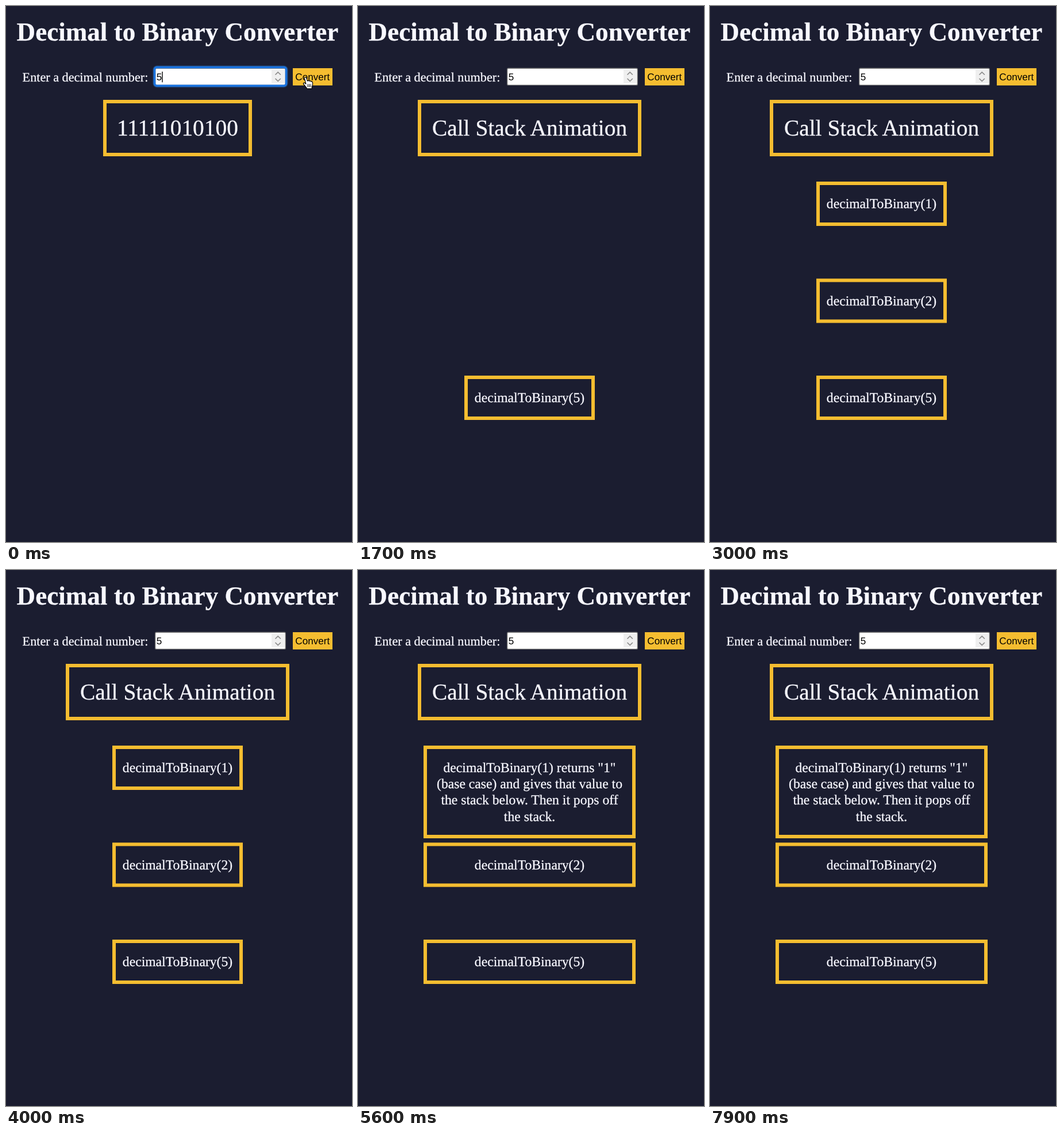
An HTML page that plays this animation: 602x931 px, repeating every 8 s.

```html
<!DOCTYPE html>
<html lang="en">
<head>
<meta charset="utf-8">
<title>Decimal to Binary Converter</title>
<style>
  html, body { margin: 0; width: 100%; height: 100%; overflow: hidden; background: #1b1d30; }
  svg { display: block; width: 602px; height: 931px; }
  text { font-family: "Liberation Serif", Times, serif; fill: #f8f8ff; stroke: #f8f8ff; stroke-width: .3; text-rendering: geometricPrecision; }
  .mid { text-anchor: middle; }
  .title { font-size: 45.1px; font-weight: bold; }
  .label { font-size: 22.2px; }
  .result { font-size: 39.4px; }
  .call { font-size: 23.65px; }
  .control { font: 17.1px "Liberation Sans", Arial, sans-serif; fill: #000; stroke: none; }
  .box { fill: none; stroke: #f5bd30; stroke-width: 6; }

  .anim { animation: 8s step-end infinite; }
  .idle { animation-name: idle; }
  .started { animation-name: started; }
  .pointer { animation-name: pointer; }
  .call5 { animation-name: call5; }
  .call2 { animation-name: call2; }
  .call1 { animation-name: call1; }
  .narrow { animation-name: narrow; }
  .wide { animation-name: wide; }
  @keyframes idle { 0% { opacity: 1 } 2.5%, 100% { opacity: 0 } }
  @keyframes started { 0% { opacity: 0 } 2.5%, 100% { opacity: 1 } }
  @keyframes call5 { 0% { opacity: 0 } 16.25%, 100% { opacity: 1 } }
  @keyframes pointer { 0% { opacity: 1 } 21.25%, 100% { opacity: 0 } }
  @keyframes call2 { 0% { opacity: 0 } 22.5%, 100% { opacity: 1 } }
  @keyframes call1 { 0% { opacity: 0 } 30%, 100% { opacity: 1 } }
  @keyframes narrow { 0% { opacity: 1 } 70%, 100% { opacity: 0 } }
  @keyframes wide { 0% { opacity: 0 } 70%, 100% { opacity: 1 } }
</style>
</head>
<body>
<svg viewBox="0 0 602 931">
  <defs>
    <rect id="narrow-box" class="box" x="188" y="308" width="221" height="71"/>
    <rect id="wide-box" class="box" x="117" y="308" width="363" height="71"/>
  </defs>

  <text class="title mid" x="298.5" y="60.3">Decimal to Binary Converter</text>
  <text class="label" x="28.6" y="131">Enter a decimal number:</text>

  <!-- number field -->
  <rect class="anim idle" x="255.5" y="103.5" width="235" height="38" rx="7" fill="#244979"/>
  <rect x="259.7" y="108.2" width="226.6" height="29.2" rx="2" fill="#fff" stroke="#777" stroke-width="1.4"/>
  <rect class="anim idle" x="258.5" y="106.5" width="229" height="32" rx="4" fill="none" stroke="#1a73e0" stroke-width="3.5"/>
  <rect x="462" y="110.5" width="22.5" height="23.5" fill="#efefef"/>
  <path d="M468.5 119.5l4.7-4.5 4.7 4.5M468.5 126l4.7 4.5 4.7-4.5" fill="none" stroke="#8b8b8b" stroke-width="1.7"/>
  <text class="control" x="261.7" y="129.2">5</text>
  <path class="anim idle" d="M272 114v18.5" stroke="#000" stroke-width="1.4"/>

  <rect x="499" y="108" width="69" height="30" fill="#f5bd30"/>
  <text class="control mid" x="533.3" y="129.2">Convert</text>

  <g class="anim idle">
    <rect class="box" x="172" y="166" width="253" height="92"/>
    <text class="result mid" x="298.5" y="225">11111010100</text>
  </g>
  <g class="anim started">
    <rect class="box" x="107" y="166" width="383" height="92"/>
    <text class="result mid" x="298.5" y="225">Call Stack Animation</text>
  </g>

  <!-- call stack -->
  <g class="anim narrow">
    <g class="anim call1">
      <use href="#narrow-box"/>
      <text class="call mid" x="298.5" y="351">decimalToBinary(1)</text>
    </g>
    <use class="anim call2" href="#narrow-box" y="168.5"/>
    <use class="anim call5" href="#narrow-box" y="337"/>
  </g>
  <g class="anim wide">
    <rect class="box" x="117" y="308" width="363" height="155"/>
    <text class="call mid" x="298.5" y="351">decimalToBinary(1) returns "1"</text>
    <text class="call mid" x="298.5" y="379.2">(base case) and gives that value to</text>
    <text class="call mid" x="298.5" y="407.3">the stack below. Then it pops off</text>
    <text class="call mid" x="298.5" y="435.5">the stack.</text>
    <use href="#wide-box" y="168.5"/>
    <use href="#wide-box" y="337"/>
  </g>
  <text class="call mid anim call2" x="298.5" y="519.7">decimalToBinary(2)</text>
  <text class="call mid anim call5" x="298.5" y="688.3">decimalToBinary(5)</text>

  <!-- hand pointer -->
  <g class="anim pointer" stroke="#000" stroke-width="1.2" stroke-linejoin="round" stroke-linecap="round">
    <path fill="#fff" d="M519.3 125.2c.3-1.9 2.8-2 3.4-.3l1.7 5.5c.5-1.3 2.6-1.4 3.1.2.7-1.1 2.7-.9 3 .7 1-.8 2.6-.2 2.8 1.4.5 2.9.5 5.4-1.1 8.1l.1 2.7h-8.6c-1.3-2.8-4.1-5-6-7.8-.9-1.5.8-2.9 2.3-1.9l1.8 1.6z"/>
    <path fill="none" d="M525 136v4.6M527.5 136v4.6M530 136v4.6" stroke-width="1"/>
  </g>
</svg>
</body>
</html>
```
